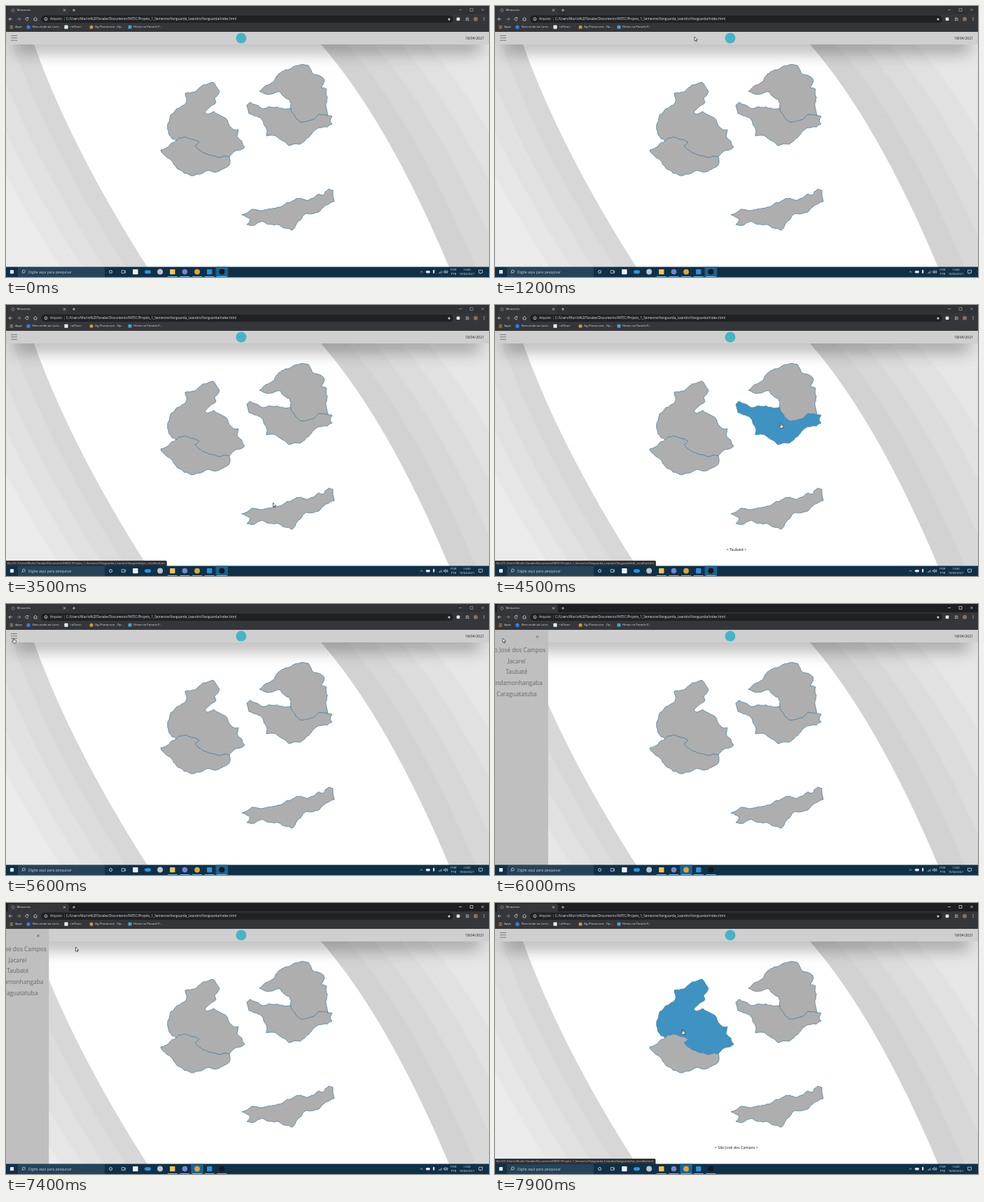
An HTML page with a canvas that plays this animation: 690x388 px, repeating every 8 s.

```html
<!DOCTYPE html>
<html lang="pt-BR">
<head>
<meta charset="utf-8">
<title>Mapa</title>
<style>
html, body { margin: 0; width: 100%; height: 100%; overflow: hidden; background: #fff; }
canvas { display: block; width: 690px; height: 388px; }
</style>
</head>
<body>
<canvas id="stage" width="690" height="388"></canvas>
<script>
const ctx = document.getElementById('stage').getContext('2d');
const LOOP = 8000, STEP = 100, TRAVEL = 450;
const OPEN_AT = 5700, CLOSE_AT = 7250, SLIDE = 400, MENU = 90;
const FONT = '"Open Sans", "Noto Sans", sans-serif';
const FOLDER = 'Documents/FATEC/Projeto_1_Semestre/Vanguarda_Leandro/Vanguarda/';
const INK = '#e4e6e9', DIM = '#9a9da1';

let seed = 7;
const rand = () => (seed = (seed * 16807) % 2147483647) / 2147483647;

// Splits a side again and again, pushing each middle sideways
function rough(a, b, amount) {
  const dx = b[0] - a[0], dy = b[1] - a[1];
  if (Math.hypot(dx, dy) < 5) return [a];
  const push = (rand() - 0.5) * amount;
  const mid = [(a[0] + b[0]) / 2 - dy * push, (a[1] + b[1]) / 2 + dx * push];
  return [...rough(a, mid, amount), ...rough(mid, b, amount)];
}

function coast(text, amount = 0.26) {
  const pts = text.split(' ').map(p => p.split(',').map(Number));
  return pts.flatMap((p, i) => i < pts.length - 1 ? rough(p, pts[i + 1], amount) : [p]);
}

function outline(...parts) {
  const path = new Path2D();
  parts.flat().forEach(([x, y]) => path.lineTo(x, y));
  path.closePath();
  return path;
}

const westBorder = coast('247,189 262,190 276,195 270,200 289,213 305,217 319,216');
const eastBorder = coast('407,146 409,153 421,166 447,155 460,157');

const regions = [
  { name: 'São José dos Campos', file: 'sjc', path: outline(westBorder,
    coast('319,216 341,202 330,187 332,177 325,177 303,155 297,151 288,155 284,152 300,138 298,132 305,122 296,109 270,123 256,125 257,139 244,147 232,167 237,190 243,193')) },
  { name: 'Jacareí', file: 'jac', path: outline(westBorder,
    coast('319,216 320,225 309,234 299,238 286,236 268,243 243,231 229,216 221,206 243,193')) },
  { name: 'Taubaté', file: 'tbt', path: outline(eastBorder,
    coast('460,157 466,158 463,164 466,169 451,174 436,184 420,198 404,200 388,188 372,186 367,164 347,154 344,142 348,138 367,147 407,146')) },
  { name: 'Pindamonhangaba', file: 'pin', path: outline([...eastBorder].reverse(),
    coast('407,146 405,134 392,123 362,122 383,108 386,101 404,91 432,85 440,98 454,104 450,117 458,119 457,143')) },
  { name: 'Caraguatatuba', file: 'crg', path: outline(
    coast('337,299 351,291 363,293 388,288 402,281 421,275 432,278 447,269 453,271 461,262 467,264 469,280 447,295 429,297 421,306 409,321 389,313 344,313 349,305 337,299')) }
];

const rowY = i => 65.7 + i * 15.8;

// Stops of the pointer: arrival time and tip position
const stops = [
  [0, 308, 402], [1000, 285, 44], [2250, 270, 175], [3050, 268, 214], [3600, 398, 293],
  [4250, 405, 176], [4850, 432, 122], [5500, 11, 49], [6700, 59, 61], [7200, 75, 46], [7750, 268, 181]
];

function ease(v) {
  v = Math.max(0, Math.min(1, v));
  return v * v * (3 - 2 * v);
}

function pointer(t) {
  return stops.reduce(([x, y], [time, nx, ny]) => {
    const k = ease((t - time) / TRAVEL + 1);
    return [x + (nx - x) * k, y + (ny - y) * k];
  }, stops[0].slice(1));
}

const menuWidth = t => MENU * (ease((t - OPEN_AT) / SLIDE) - ease((t - CLOSE_AT) / SLIDE));

function hover(t) {
  const [x, y] = pointer(t);
  const inMenu = x < menuWidth(t);
  const link = regions.findIndex((r, i) => inMenu
    ? Math.abs(y - rowY(i)) < 7.9
    : ctx.isPointInPath(r.path, x, y));
  const button = Math.hypot(x - (inMenu ? 75 : 11), y - 46) < 6;
  return { link, inMenu, hand: link >= 0 || button };
}

// The link address lingers briefly after the pointer leaves
function lastLink(t) {
  for (let back = 0; back <= 200; back += STEP) {
    const { link } = hover(Math.max(0, t - back));
    if (link >= 0) return link;
  }
  return -1;
}

function rect(x, y, w, h, fill, r = 0) {
  ctx.beginPath();
  ctx.roundRect(x, y, w, h, r);
  ctx.fillStyle = fill;
  ctx.fill();
}

const square = (x, y, size, fill) => rect(x - size / 2, y - size / 2, size, size, fill, 0.8);

function dot(x, y, r, fill) {
  ctx.beginPath();
  ctx.arc(x, y, r, 0, 7);
  ctx.fillStyle = fill;
  ctx.fill();
}

function icon(d, x, y, color = INK, width = 0.7) {
  ctx.save();
  ctx.translate(x, y);
  ctx.strokeStyle = color;
  ctx.lineWidth = width;
  ctx.stroke(new Path2D(d));
  ctx.restore();
}

function text(s, x, y, size, fill = INK, align = 'left') {
  ctx.font = `${size}px ${FONT}`;
  ctx.textAlign = align;
  ctx.fillStyle = fill;
  ctx.fillText(s, x, y + size * 0.36);
}

const CROSS = 'M-1.6-1.6l3.2 3.2m0-3.2l-3.2 3.2';
const ARROW_LEFT = 'M2.4 0h-4.8l2.3-2.3m0 4.6l-2.3-2.3';
const RING = 'M-2 0a2 2 0 1 0 4 0a2 2 0 1 0-4 0';
const BOX = 'M-2-2h4v4h-4z';

// Curved sheet from an edge of the page to a side of the stage
function sheet([x0, cx, cy, x1], shift, grey, end) {
  ctx.beginPath();
  ctx.moveTo(x0 + shift, 37);
  ctx.lineTo(x0 + shift, 55);
  ctx.quadraticCurveTo(cx + shift, cy, x1 + shift, 374);
  ctx.lineTo(end, 374);
  ctx.lineTo(end, 37);
  ctx.fillStyle = `rgb(${grey},${grey},${grey})`;
  ctx.fill();
}

function header() {
  ctx.save();
  ctx.shadowColor = 'rgba(0,0,0,.4)';
  ctx.shadowBlur = 25;
  ctx.shadowOffsetY = 9;
  rect(12, 37, 666, 18, '#cfcfcf');
  ctx.restore();
  rect(0, 37, 690, 18, '#cfcfcf');
  for (let i = 0; i < 3; i++) rect(7, 42 + i * 3.4, 9, 0.8, '#666');
  dot(336, 46, 7.5, '#45b5c6');
  text('18/04/2021', 656, 45.7, 5.1, '#222');
}

function page(over) {
  rect(0, 37, 690, 337, '#fff');
  for (let i = 0; i < 5; i++) {
    sheet([40, 93, 203, 202], -i * 31, 215 + i * 5, -200);
    sheet([450, 545.5, 165, 633], i * 38, 210 + i * 5, 900);
  }
  header();
  regions.forEach((r, i) => {
    ctx.fillStyle = i === over ? '#3e93c3' : '#aeaeae';
    ctx.fill(r.path);
    ctx.strokeStyle = '#4f83a3';
    ctx.lineWidth = 0.8;
    ctx.stroke(r.path);
  });
  if (over >= 0) text(`< ${regions[over].name} >`, 345, 349.8, 5.35, '#111', 'center');
}

function sideMenu(w, row) {
  if (w <= 0) return;
  ctx.save();
  ctx.beginPath();
  ctx.rect(0, 37, w, 337);
  ctx.clip();
  ctx.translate(w - MENU, 0);
  rect(0, 37, MENU, 337, '#bfbfbf');
  icon(CROSS, 74.5, 47, '#444');
  regions.forEach((r, i) =>
    text(r.name, 45, rowY(i), 8.35, i === row ? '#1c1c1c' : '#686868', 'center'));
  ctx.restore();
}

function browser(focused) {
  const control = focused ? INK : DIM;
  rect(0, 0, 690, 12, focused ? '#1e1f22' : '#313235');
  rect(3, 1, 87, 12, '#35363a', [3, 3, 0, 0]);
  icon(RING, 10, 6.2, DIM);
  text('Miravento', 15.5, 6, 4.15);
  icon(CROSS, 83.5, 6);
  icon('M-2 0h4m-2-2v4', 97, 6);
  icon('M-2 0h4', 649, 5.5, control);
  icon(BOX, 665, 5.5, control);
  icon(CROSS, 681, 5.5, control);

  rect(0, 12, 690, 25, '#35363a');
  icon(ARROW_LEFT, 6.5, 18.7);
  ctx.save();
  ctx.scale(-1, 1);
  icon(ARROW_LEFT, -18.5, 18.7, DIM);
  ctx.restore();
  icon('M1.6-1.4a2.1 2.1 0 1 0 .4 2m-.2-3v1.5h-1.5', 30, 18.7);
  icon('M-2.6 0l2.6-2.5l2.6 2.5m-4.4-.5v2.7h3.6v-2.7', 42, 18.7);
  rect(50, 13.4, 589, 10.6, '#202124', 5.3);
  icon(RING + 'M0-1v.5m0 .6v1', 57, 18.7);
  text('Arquivo', 63, 18.6, 4.7);
  rect(83, 16, 0.5, 5.5, '#6b6d70');
  text('C:/Users/Murilo%20Tanabe/' + FOLDER + 'index.html', 86, 18.6, 4.73);
  text('★', 633, 18.6, 6, INK, 'center');
  square(646, 18.7, 4.6, INK);
  icon('M-2.2-1.6h4m-4 1.7h2.6m-2.6 1.7h2.6m1.4-3v3.8', 659, 18.7);
  dot(671, 18.7, 3, '#8b6f5c');
  for (let i = -1; i < 2; i++) dot(683, 18.7 + i * 1.8, 0.55, INK);

  for (let i = 0; i < 9; i++) {
    dot(6 + i % 3 * 1.8, 28.4 + Math.floor(i / 3) * 1.8, 0.7, ['#ea5a4d', '#f1bd42', '#4ba366'][i % 3]);
  }
  dot(32, 30.2, 2.7, '#2d7de8');
  square(86, 30.2, 5.2, '#dcefed');
  dot(122, 30.2, 2.5, '#c79a45');
  square(177, 30.2, 4.8, '#3fa9d6');
  text('Apps', 13.3, 30, 4.1);
  text('Bem-vindo ao Lumi...', 38, 30, 4.1);
  text('<olTeca>', 91.3, 30, 4.1);
  text('Zig-Pluma.com - Op...', 127, 30, 4.1);
  text('Filmes no Pomelo P...', 182, 30, 4.1);
}

function status(link) {
  if (link < 0) return;
  const s = 'file:///C:/Users/Murilo Tanabe/' + FOLDER + regions[link].file + '_escolha.html';
  ctx.font = `4.07px ${FONT}`;
  rect(0, 366, ctx.measureText(s).width + 5, 8, '#303134', [0, 1.5, 0, 0]);
  text(s, 1.8, 369.8, 4.07, '#c3c5c8');
}

// The ten buttons beside the search box, evenly spaced
function appButtons(focused) {
  const slot = i => 149.6 + i * 17.64, y = 380.6;
  rect(slot(focused ? 7 : 9) - 8.8, 373.5, 17.6, 14.5, '#1b628f');
  icon(RING, slot(0), y, INK, 0.9);
  icon(BOX + 'M3.2-2v4', slot(1), y);
  square(slot(2), y, 7.4, '#eef1f3');
  rect(slot(3) - 4.5, 378.2, 9, 5, '#2b95dd', 2.4);
  dot(slot(4), y, 4, '#b9c3ca');
  square(slot(5), y, 7.4, '#f0c453');
  dot(slot(6), y, 3.8, '#7387cf');
  dot(slot(7), y, 3.9, '#dda53c');
  square(slot(8), y, 7.3, '#2b92d6');
  dot(slot(9), y, 4, '#17191d');
  for (let i = 5; i < 10; i++) rect(slot(i) - 7, 387, 14, 1, '#78b5df');
}

function taskbar(focused) {
  rect(0, 373.5, 690, 14.5, '#0f3049');
  square(8.5, 380.6, 5.2, INK);
  rect(17, 374, 124, 14, '#25435a');
  icon(RING + 'M-1.4 1.4l-1.5 1.5', 25.4, 380);
  text('Digite aqui para pesquisar', 32, 380.8, 5.08, '#c9d2d9');
  appButtons(focused);

  icon('M-1.8.9l1.8-1.8l1.8 1.8', 593.5, 380.7);
  rect(599.7, 379, 6.2, 3.5, INK, 1.7);
  rect(610, 377.8, 2.2, 5, INK, 1);
  for (let i = 0; i < 4; i++) rect(617.6 + i * 1.4, 382 - i, 0.8, 1 + i, '#91a7b6');
  icon('M-2.6-.8h1.1l1.5-1.4v4.4l-1.5-1.4h-1.1zM1.2-1.2q.8 1.2 0 2.4m1.1-3.2q1.3 2 0 4', 628, 380.7);
  text('POR', 639.4, 377.6, 4.05, INK, 'center');
  text('PTB', 639.4, 383.9, 4.05, INK, 'center');
  text('13:00', 658.5, 377.6, 4.05, INK, 'center');
  text('18/04/2021', 658.5, 383.9, 4.05, INK, 'center');
  icon('M-2.6-2.3h5.2v3.9h-1.8l-1.4 1.4v-1.4h-2z', 678, 380.5);
}

const ARROW = new Path2D('M0 0v6.2l1.5-1.3l1 2.1l.9-.4l-.9-2.1h1.9z');
const HAND = new Path2D('M-.7.5q.7-.9 1.4 0v2.1l2.3.5q.6.2.5.9l-.5 3h-3.6l-2.1-2.6q.5-1 1.3-.2l.7.5z');

function cursor([x, y], shape) {
  ctx.save();
  ctx.translate(x, y);
  ctx.fillStyle = '#fff';
  ctx.strokeStyle = '#222';
  ctx.lineWidth = 0.7;
  ctx.fill(shape);
  ctx.stroke(shape);
  ctx.restore();
}

function draw(now) {
  const t = Math.floor(now % LOOP / STEP) * STEP;
  const { link, inMenu, hand } = hover(t);
  const focused = t >= OPEN_AT;
  page(inMenu ? -1 : link);
  sideMenu(menuWidth(t), inMenu ? link : -1);
  browser(focused);
  status(lastLink(t));
  taskbar(focused);
  cursor(pointer(t), hand ? HAND : ARROW);
}

const start = performance.now();
function tick() {
  draw(performance.now() - start);
  requestAnimationFrame(tick);
}
tick();
</script>
</body>
</html>
```
